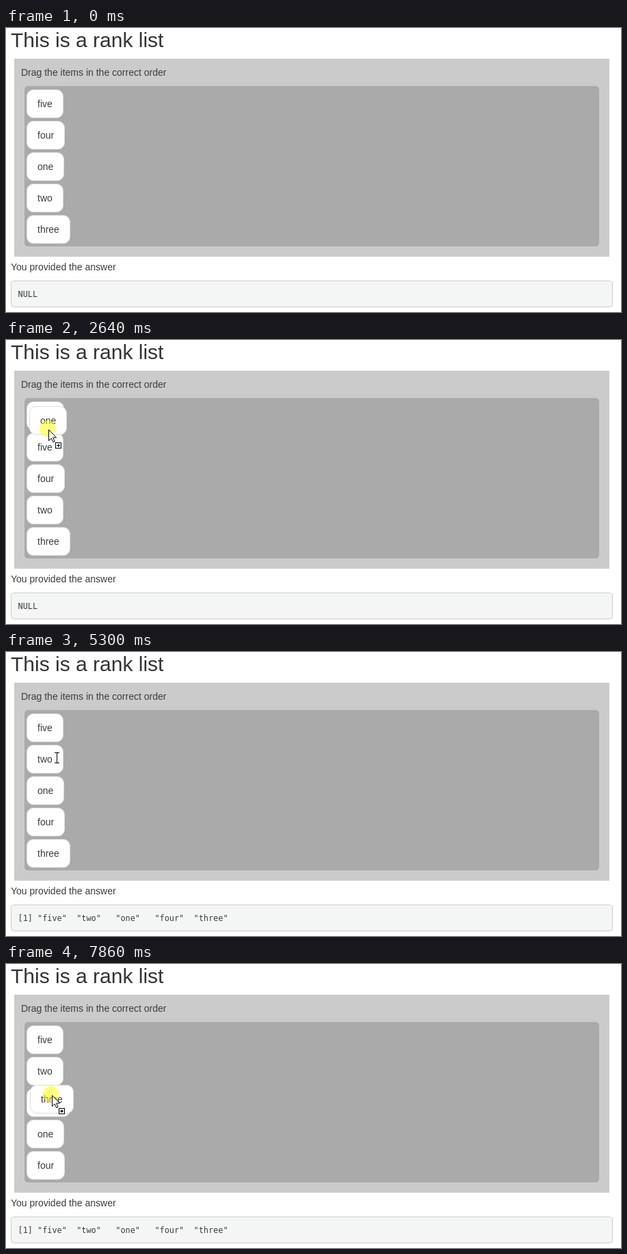
An HTML page that plays this animation: 899 by 416 pixels, repeating every 8000 ms.

```html
<!DOCTYPE html>
<html lang="en">
<head>
<meta charset="utf-8">
<title>Rank list</title>
<style>
  html, body { margin: 0; width: 100%; height: 100%; overflow: hidden; background: #fff; }
  svg { display: block; font: 14px "Liberation Sans", Arial, sans-serif; fill: #3c3c3c; cursor: default; }
  .title { font-size: 30px; fill: #333; }
  .item rect { fill: #fff; stroke: #ddd; }
  #output { font: 11.87px "DejaVu Sans Mono", monospace; white-space: pre; }
</style>
</head>
<body>
<svg width="899" height="416" viewBox="0 0 899 416">
  <text class="title" x="7" y="28">This is a rank list</text>
  <rect x="12" y="45" width="870" height="290" fill="#cbcbcb"/>
  <text x="22" y="70">Drag the items in the correct order</text>
  <rect x="27" y="85" width="840" height="235" rx="5" fill="#aaa"/>
  <g id="list"></g>
  <text x="7" y="355">You provided the answer</text>
  <rect x="7.5" y="370.5" width="879" height="38" rx="4" fill="#f4f5f5" stroke="#ccc"/>
  <text id="output" x="17.5" y="394"></text>
  <g id="ghosts"></g>
  <g id="pointer">
    <circle id="press" cx="-1" cy="-1" r="12" fill="#ff0" fill-opacity=".5"/>
    <path id="arrow" d="M.5 .5v16l3.7-3.5 2.6 5.6 2.3-1-2.5-5.6h5z" fill="#fff" stroke="#000"/>
    <path id="beam" d="M-2 -7.5H5M1.5 -7.5V7.5M-2 7.5H5" fill="none" stroke="#000"/>
    <g id="badge">
      <rect x="10.5" y="19.5" width="8" height="8" fill="#fff" stroke="#000"/>
      <path d="M12 23h2v-2l3 2.5-3 2.5v-2h-2z" fill="#000"/>
    </g>
  </g>
</svg>
<script>
const LOOP = 8000, LEFT = 30, TOP = 90, PITCH = 46;
const DRAG_DELAY = 100, REPLY_DELAY = 80;
const widths = { five: 54, four: 56, one: 55, two: 54, three: 64 };
const startOrder = Object.keys(widths);

// Pointer moves: start, end, x, y reached, sideways bow
const entry = { x: 649, y: 402 };
const moves = [
  [420, 1140, 90, 292],
  [1180, 1360, 57, 227],
  [1540, 1830, 58, 216],
  [2025, 2690, 62, 129, 3.4],
  [2900, 3320, 51, 189],
  [3560, 3620, 52, 184],
  [3740, 3940, 64, 252],
  [4310, 4950, 73, 155, 9.5],
  [5340, 5900, 63, 234],
  [5950, 6200, 62, 281],
  [6330, 6450, 62, 289],
  [6970, 7860, 67, 192, 6]
];
const drags = [
  { name: "one", press: 1980, drop: 2920 },
  { name: "two", press: 4260, drop: 5130 },
  { name: "three", press: 6840, drop: Infinity }
];

const byId = id => document.getElementById(id);
const output = byId("output");
const show = (el, on) => el.setAttribute("visibility", on ? "visible" : "hidden");
const place = (el, x, y) => el.setAttribute("transform", `translate(${x} ${y})`);
const easeOut = u => 1 - (1 - u) ** 1.5;

function makeItem(parent, name) {
  parent.insertAdjacentHTML("beforeend",
    `<g class="item"><rect x=".5" y=".5" width="${widths[name] - 1}" height="41" rx="9.5"/>` +
    `<text x="16" y="26">${name}</text></g>`);
  return parent.lastElementChild;
}
const items = {}, copies = {};
for (const name of startOrder) {
  items[name] = makeItem(byId("list"), name);
  copies[name] = makeItem(byId("ghosts"), name);
}

function pointerAt(t) {
  let { x, y } = entry;
  for (const [start, end, toX, toY, bow = 0] of moves) {
    if (t < start) break;
    const k = easeOut(Math.min(1, (t - start) / (end - start)));
    x += (toX - x) * k + bow * Math.sin(Math.PI * k);
    y += (toY - y) * k;
  }
  return [Math.round(x), Math.round(y)];
}

// A dragged item takes the slot the pointer has entered.
function orderAt(t) {
  const order = [...startOrder];
  for (const { name, press, drop } of drags) {
    if (t < press + DRAG_DELAY) break;
    const y = pointerAt(Math.min(t, drop))[1];
    order.splice(order.indexOf(name), 1);
    order.splice(Math.ceil((y - 131) / PITCH), 0, name);
  }
  return order;
}

function answerAt(t) {
  const last = drags.findLast(d => t >= d.drop + REPLY_DELAY);
  if (!last) return "NULL";
  return "[1] " + orderAt(last.drop).map(n => `"${n}"`.padEnd(7)).join(" ");
}

function render(t) {
  const [x, y] = pointerAt(t);
  orderAt(t).forEach((name, slot) => place(items[name], LEFT, TOP + slot * PITCH));

  const pressed = drags.find(d => t >= d.press && t < d.drop);
  const dragging = pressed && t >= pressed.press + DRAG_DELAY;
  for (const name of startOrder) show(copies[name], dragging && pressed.name === name);
  if (dragging) {
    const [grabX, grabY] = pointerAt(pressed.press);
    const slot = orderAt(pressed.press).indexOf(pressed.name);
    place(copies[pressed.name], LEFT + x - grabX, TOP + slot * PITCH + y - grabY);
  }

  const visible = t >= moves[0][0];
  const inLine = (y - TOP) % PITCH;
  const overText = !dragging && x > 45 && x < 76 && y > TOP && y < 320 && inLine >= 12 && inLine <= 32;
  place(byId("pointer"), x, y);
  show(byId("press"), pressed);
  show(byId("badge"), dragging);
  show(byId("beam"), visible && overText);
  show(byId("arrow"), visible && !overText);

  const answer = answerAt(t);
  if (output.textContent !== answer) output.textContent = answer;
}

function tick() {
  render(performance.now() % LOOP);
  requestAnimationFrame(tick);
}
tick();
</script>
</body>
</html>
```
